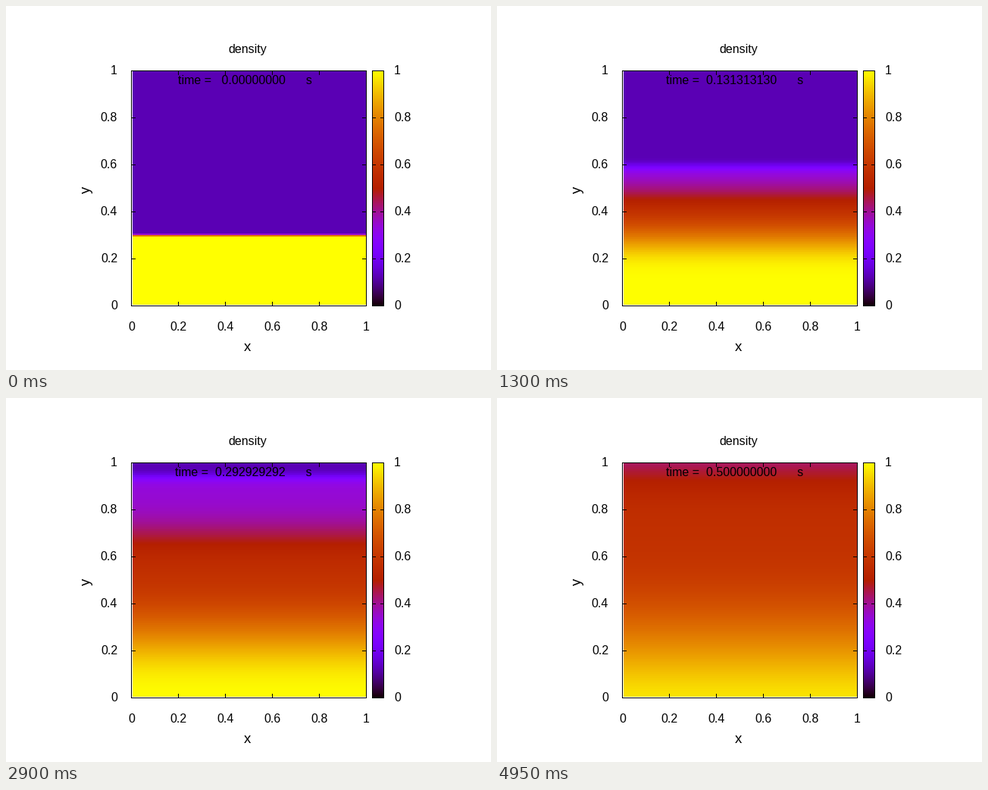
A matplotlib script for the animation above (5 s loop, 640 by 480 pixels).

```python
import numpy as np
import matplotlib.pyplot as plt
from matplotlib.animation import FuncAnimation
from matplotlib.patches import Rectangle

W, H, DPI = 640, 480, 100
FRAMES, INTERVAL = 100, 50
T_END = 0.5
CELLS, DX, GAMMA = 100, 0.01, 1.4
SUBSTEPS = 4
LEFT, RIGHT, TOP, BOTTOM = 165, 475, 85, 395
SPAN = BOTTOM - TOP
TICKS = ["0", "0.2", "0.4", "0.6", "0.8", "1"]

plt.rcParams["font.family"] = "Liberation Sans"


def palette(v):
    """Black - violet - red - yellow colour ramp."""
    v = np.clip(v, 0, 1)
    blue = np.clip(np.sin(2 * np.pi * v), 0, 1)
    return np.stack([np.sqrt(v), v**3, blue], axis=-1)


def flux(q):
    rho, mom, energy = q
    u = mom / rho
    p = (GAMMA - 1) * (energy - 0.5 * mom * u)
    speed = np.abs(u) + np.sqrt(GAMMA * p / rho)
    return np.array([mom, mom * u + p, u * (energy + p)]), speed


def step(q, dt):
    """One first-order Rusanov step with open ends."""
    g = np.pad(q, ((0, 0), (1, 1)), mode="edge")
    f, s = flux(g)
    s = np.maximum(s[:-1], s[1:])
    face = 0.5 * (f[:, :-1] + f[:, 1:]) - 0.5 * s * (g[:, 1:] - g[:, :-1])
    return q - dt / DX * (face[:, 1:] - face[:, :-1])


def solve():
    """Density profiles of the shock tube, one per frame."""
    y = (np.arange(CELLS) + 0.5) * DX
    low = y < 0.3
    rho = np.where(low, 1.0, 0.125)
    u = np.where(low, 0.75, 0.0)
    p = np.where(low, 1.0, 0.1)
    q = np.array([rho, rho * u, p / (GAMMA - 1) + 0.5 * rho * u**2])
    dt = T_END / (FRAMES - 1) / SUBSTEPS
    out = [q[0]]
    for _ in range(FRAMES - 1):
        for _ in range(SUBSTEPS):
            q = step(q, dt)
        out.append(q[0])
    return out


profiles = solve()

# Each cell gap is split into two flat bands.
rows = np.arange(TOP + 1, BOTTOM - 1)
pos = ((BOTTOM - 0.5 - rows) / SPAN - DX / 2) / DX
bands = np.clip((np.floor(2 * pos) + 0.5) / 2, 0, CELLS)


def field(i):
    rho = np.append(profiles[i], profiles[i][-1])
    return palette(np.interp(bands, np.arange(CELLS + 1), rho))[:, None, :]


def time_label(i):
    t = float(np.float32(i * T_END / (FRAMES - 1)))
    if i == 0:
        return "time =   0.00000000      s"
    if t < 0.1:
        return f"time =   {t:.8E}  s"
    return f"time =  {t:.9f}      s"


fig = plt.figure(figsize=(W / DPI, H / DPI), dpi=DPI, facecolor="white")
ax = fig.add_axes([0, 0, 1, 1])
ax.axis("off")


def bar(x, y, w, h):
    ax.add_patch(Rectangle((x, y), w, h, fc="black", lw=0,
                           antialiased=False, zorder=3))


def frame(x0, y0, x1, y1):
    for y in (y0, y1):
        bar(x0, y, x1 - x0 + 1, 1)
    for x in (x0, x1):
        bar(x, y0, 1, y1 - y0 + 1)


def text(x, y, s, px=16, ha="center", va="baseline", **kw):
    return ax.text(x, y, s, fontsize=px * 72 / DPI, ha=ha, va=va,
                   color="black", zorder=4, **kw)


def image(data, x0, x1, y0, y1):
    return ax.imshow(data, extent=(x0, x1, y1, y0), aspect="auto",
                     interpolation="nearest", zorder=1)


picture = image(field(0), LEFT + 2, RIGHT, TOP + 1, BOTTOM - 1)
scale_rows = np.arange(TOP, BOTTOM + 1)
image(palette((BOTTOM - scale_rows) / SPAN)[:, None, :],
      483, 499, TOP, BOTTOM + 1)

frame(LEFT, TOP, RIGHT, BOTTOM)
frame(483, TOP, 498, BOTTOM)

for k, name in enumerate(TICKS):
    x, y = LEFT + 62 * k, BOTTOM - 62 * k
    text(x + 0.5, 428, name)
    text(147, y + 5, name, ha="right")
    text(512, y + 5, name, ha="left")
    if 0 < k < 5:
        bar(x, TOP, 1, 6)
        bar(x, BOTTOM - 5, 1, 6)
        bar(LEFT, y, 6, 1)
        bar(RIGHT - 5, y, 6, 1)
        bar(483, y, 5, 1)
        bar(494, y, 5, 1)

text(318.5, 62, "density")
text(318, 455, "x", px=18.67)
text(106, 242, "y", px=18.67, va="center", rotation=90)
clock = text(404, 103, time_label(0), ha="right")

ax.set_xlim(0, W)
ax.set_ylim(H, 0)


def update(i):
    picture.set_data(field(i))
    clock.set_text(time_label(i))
    return picture, clock


anim = FuncAnimation(fig, update, frames=FRAMES, interval=INTERVAL,
                     repeat=True, repeat_delay=0, blit=False)
plt.show()
```
